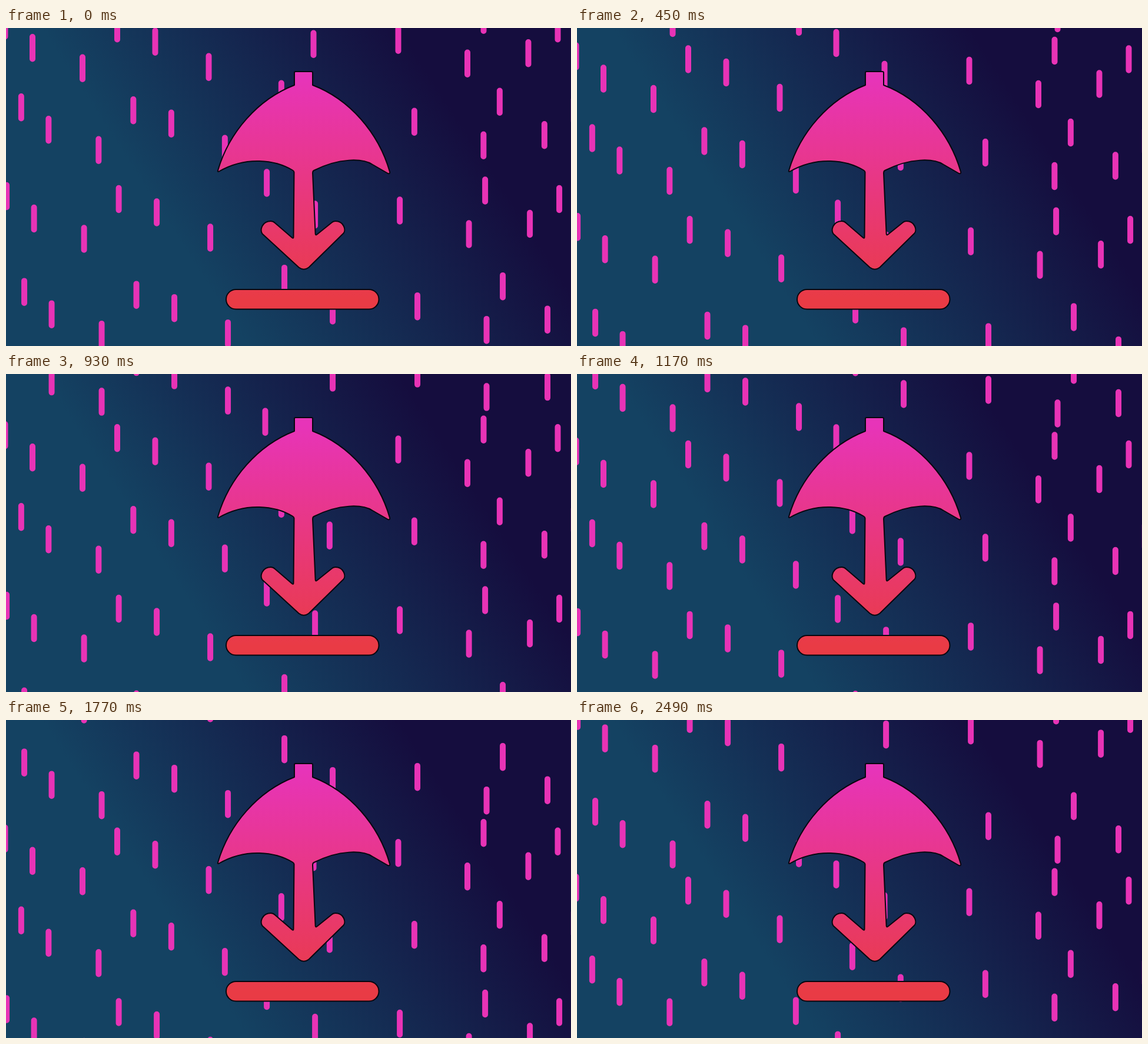
These frames come from a looping animation (960 by 540 pixels, 2.52 s). An HTML page with a canvas:

```html
<!DOCTYPE html>
<html lang="en">
<head>
<meta charset="utf-8">
<title>Umbrella in the rain</title>
<style>
  html, body { margin: 0; width: 100%; height: 100%; overflow: hidden; background: #150d3e; }
  canvas { display: block; }
</style>
</head>
<body>
<canvas id="stage" width="960" height="540"></canvas>
<script>
const ctx = document.getElementById('stage').getContext('2d');
const LOOP = 2520, STEP = 30, SPEED = 0.1161, TILE = 581.5, ROWS = 4;

// Key points (centre x, top y) of one row of drops; the other rows follow by rule.
const row0 = [
  [-1.5, -28], [45, 10], [130, 44.5], [189, -23], [253.5, -0.5], [344.5, 42.5], [440.5, -50.5],
  [522.5, 3.5], [666.5, -3.5], [784, 36.5], [811.5, -37.5], [887.5, 19], [937.5, -23]
];

function gradient(x0, y0, x1, y1, from, to) {
  const g = ctx.createLinearGradient(x0, y0, x1, y1);
  g.addColorStop(0, from);
  g.addColorStop(1, to);
  return g;
}
const sky = gradient(42, -27, 470, -305, '#144262', '#150d3e');
const warm = gradient(0, 85, 0, 462, '#e734b9', '#e93b45');

const umbrella = new Path2D(`
  M490 76 Q490 74 492 74 H519 Q521 74 521 76 V97
  C584 121 633 178 652 244 Q653 248 649 247 L623 232
  C606 221 566 220 523 242 Q521 243 521 246
  L525.7 350 Q526 352.5 528.5 350.5 L554 330
  Q556 328 560 328 C574 328 578 343 573.5 348.5
  L514.5 406.5 Q506 413 497.5 406.5 L435.5 349.5
  C431 343 435 328 450 328 Q454 328 457 331
  L486 356 Q488.5 358 488.5 355 L489.5 245 Q489.5 243 487 241.5
  C458 224 408 217 362 243.5 Q359 244.5 360 242
  C379 177 428 121 490 97 Z`);
const bar = new Path2D();
bar.roundRect(374, 444, 259.5, 33.5, 17);

function drawRain(fall) {
  ctx.fillStyle = '#e833b6';
  ctx.beginPath();
  for (let row = 0; row < ROWS; row++) {
    const dx = row % 2 * 26.7 + row * row * 0.65;
    const dy = row * (133.1 + row * 5.9);
    for (const [x, y] of row0) {
      for (const lift of [0, TILE]) ctx.roundRect(x + dx - 5, y + dy + fall - lift, 10, 47.5, 5);
    }
  }
  ctx.fill();
}

function draw(now) {
  const time = Math.floor((now % LOOP) / STEP) * STEP;
  ctx.fillStyle = sky;
  ctx.fillRect(0, 0, 960, 540);
  drawRain(time * SPEED);
  ctx.fillStyle = warm;
  ctx.strokeStyle = '#08060e';
  ctx.lineWidth = 2;
  ctx.lineJoin = 'round';
  for (const shape of [umbrella, bar]) {
    ctx.fill(shape);
    ctx.stroke(shape);
  }
}

function tick() {
  draw(performance.now());
  requestAnimationFrame(tick);
}
tick();
</script>
</body>
</html>
```
